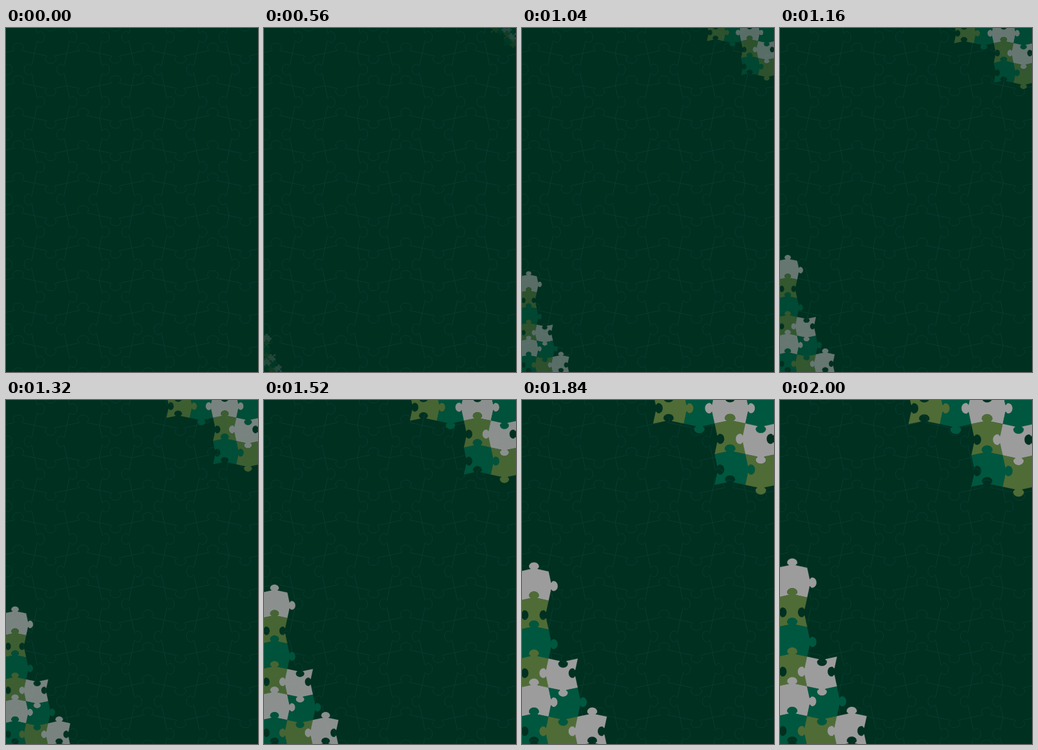
An HTML page for the animation above (5000 ms loop, 393 px wide and 538 px high).

```html
<!DOCTYPE html>
<html lang="en">
<head>
<meta charset="utf-8">
<title>Puzzle corners</title>
<style>
  html, body { margin: 0; width: 100%; height: 100%; overflow: hidden; background: #003020; }
  svg { display: block; width: 100vw; height: 100vh; }
  #lines { fill: none; stroke: #0c423a; stroke-width: .7; }
</style>
</head>
<body>
<svg viewBox="0 0 393 538" preserveAspectRatio="none">
  <path id="lines"/>
  <g id="bottomLeft"></g>
  <g id="topRight"></g>
</svg>
<script>
const LOOP = 5000, STEP = 40, GROW_START = 240, GROW_END = 2000;
const COLORS = { w: '#9c9c9c', o: '#4f6c36', t: '#00573f' };
const byId = id => document.getElementById(id);

// Jigsaw edge between two points; side +1 puts the knob left of the direction of travel.
function edge([ax, ay], [bx, by], side) {
  const dx = bx - ax, dy = by - ay;
  const at = (u, v) => [ax + dx * u + dy * v * side, ay + dy * u - dx * v * side]
    .map(n => n.toFixed(2)).join(' ');
  return `L${at(.35, .075)}` +
    `C${at(.39, .083)} ${at(.405, .09)} ${at(.375, .107)}` +
    `C${at(.345, .125)} ${at(.332, .145)} ${at(.332, .175)}` +
    `C${at(.332, .255)} ${at(.41, .313)} ${at(.5, .313)}` +
    `C${at(.59, .313)} ${at(.668, .255)} ${at(.668, .175)}` +
    `C${at(.668, .145)} ${at(.655, .125)} ${at(.625, .107)}` +
    `C${at(.595, .09)} ${at(.61, .083)} ${at(.65, .075)}` +
    `L${at(1, 0)}`;
}
const sign = c => c === '-' ? -1 : 1;

// across(row): knobs of horizontal edges, + is up. down(row): knobs of vertical edges, + is right.
function drawPieces(group, { x, y, size, rows, across, down }) {
  const point = (c, r) => [x + c * size, y + r * size];
  rows.forEach((row, r) => [...row].forEach((key, c) => {
    if (!COLORS[key]) return;
    const [a, b, d, e] = [point(c, r), point(c + 1, r), point(c + 1, r + 1), point(c, r + 1)];
    const path = document.createElementNS('http://www.w3.org/2000/svg', 'path');
    path.setAttribute('d', `M${a}` +
      edge(a, b, sign(across(r)[c])) +
      edge(b, d, sign(down(r)[c + 1])) +
      edge(d, e, -sign(across(r + 1)[c])) +
      edge(e, a, -sign(down(r)[c])) + 'Z');
    path.setAttribute('fill', COLORS[key]);
    path.setAttribute('stroke', COLORS[key]);
    path.setAttribute('stroke-width', .3);
    group.append(path);
  }));
}

function drawLines() {
  const w = 50.6, h = 50.8;
  const point = (c, r) => [-6.3 + c * w, -11.3 + r * h];
  let d = '';
  for (let r = 0; r < 12; r++) {
    const across = r === 2 ? '+--++-+-' : '+-+-+-+-';
    const down = r % 2 === 0 ? '-+++-++-+' : r % 4 === 1 && r > 4 ? '+---+---+' : '+--++--++';
    for (let c = 0; c < 9; c++) {
      const a = point(c, r);
      if (c < 8) d += `M${a}` + edge(a, point(c + 1, r), sign(across[c]));
      d += `M${a}` + edge(a, point(c, r + 1), sign(down[c]));
    }
  }
  byId('lines').setAttribute('d', d);
}

drawLines();
drawPieces(byId('bottomLeft'), {
  x: -4.1, y: 262.4, size: 46.4,
  rows: ['w', 'o', 't', 'ow', 'wt', 'tow'],
  across: () => '+-+',
  down: r => r % 2 ? '+---' : '-+++'
});
drawPieces(byId('topRight'), {
  x: 200.5, y: -11.4, size: 49,
  rows: ['otwt', '  ow', '  to'],
  across: r => r ? '+-+-' : '-+-+',
  down: r => ['++-++', '+++--', '+++++'][r]
});

// Sine ease in and out; drives both scale and opacity.
function growth(t) {
  if (t < GROW_START) return 0;
  if (t >= GROW_END) return 1;
  return (1 - Math.cos(Math.PI * (.0346 + .000474 * t))) / 2;
}

function render(now) {
  const t = Math.floor((now % LOOP) / STEP) * STEP;
  const s = growth(t);
  for (const [id, x, y] of [['bottomLeft', 0, 538], ['topRight', 393, 0]]) {
    byId(id).setAttribute('transform', `translate(${x} ${y}) scale(${s}) translate(${-x} ${-y})`);
    byId(id).setAttribute('opacity', Math.min(1, s * 1.04));
  }
}

const start = performance.now();
function tick() {
  render(performance.now() - start);
  requestAnimationFrame(tick);
}
tick();
</script>
</body>
</html>
```
